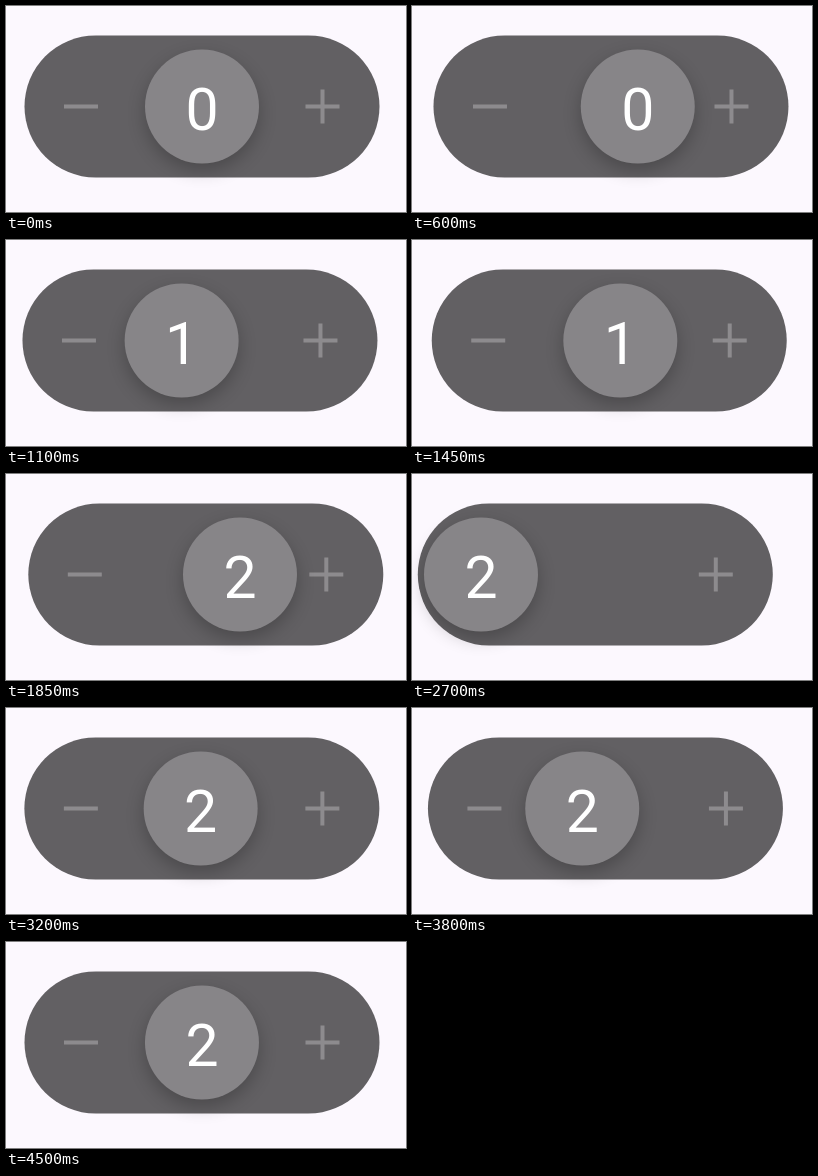
An HTML page with a canvas for the animation above (4.6 s loop, 400 by 206 pixels).

```html
<!DOCTYPE html>
<html lang="en">
<head>
<meta charset="utf-8">
<title>Stepper</title>
<style>
  html, body { margin: 0; width: 100%; height: 100%; overflow: hidden; background: #fcf8fe; }
  canvas { display: block; width: 400px; height: 206px; }
</style>
</head>
<body>
<canvas id="stage" width="400" height="206"></canvas>
<script>
const ctx = document.getElementById('stage').getContext('2d');
const LOOP = 4600, TICK = 50;
const CENTER = { x: 196, y: 100.5 };
const FOLLOW = 0.1; // share of the thumb's travel the track takes on

// Each drag pulls the thumb to `reach`, holds it, then lets it spring back.
const drags = [
  { start: 480,  held: 860,  release: 925,  reach: 126,  step: 1 },
  { start: 1390, held: 1720, release: 1762, reach: 147,  step: 1 },
  { start: 2200, held: 2630, release: 2725, reach: -127, step: 0 },
  { start: 3175, held: 3620, release: 3706, reach: -127, step: 0 },
];

const smooth = p => p * p * (3 - 2 * p);

// Under-damped spring: stiffness 400, damping ratio 0.5.
function spring(ms) {
  const s = ms / 1000, freq = 20, ratio = 0.5;
  const root = Math.sqrt(1 - ratio * ratio), angle = freq * root * s;
  return Math.exp(-ratio * freq * s) * (Math.cos(angle) + ratio / root * Math.sin(angle));
}

function dragOffset(d, t) {
  if (t <= d.start) return 0;
  if (t < d.release) return d.reach * smooth(Math.min(1, (t - d.start) / (d.held - d.start)));
  return d.reach * spring(t - d.release);
}

function bar(x, y, w, h) {
  ctx.fillRect(x - w / 2, y - h / 2, w, h);
}

function drawTrack(shift) {
  ctx.save();
  ctx.translate(shift, 0);
  ctx.fillStyle = '#626063';
  ctx.beginPath();
  ctx.arc(89.5, CENTER.y, 71, Math.PI / 2, Math.PI * 1.5);
  ctx.arc(302.5, CENTER.y, 71, -Math.PI / 2, Math.PI / 2);
  ctx.fill();
  ctx.fillStyle = '#8d8b8e';
  bar(75, CENTER.y, 34, 4);
  bar(316.5, CENTER.y, 34, 4);
  bar(316.5, CENTER.y, 4, 34);
  ctx.restore();
}

function drawThumb(x, count) {
  ctx.save();
  ctx.shadowColor = 'rgba(0, 0, 0, 0.24)';
  ctx.shadowBlur = 18;
  ctx.shadowOffsetY = 7;
  ctx.fillStyle = '#878588';
  ctx.beginPath();
  ctx.arc(x, CENTER.y, 57, 0, Math.PI * 2);
  ctx.fill();
  ctx.restore();

  ctx.fillStyle = '#fff';
  ctx.font = '59px Roboto, sans-serif';
  ctx.textAlign = 'center';
  ctx.fillText(count, x, 123.5);
}

function draw(t) {
  let offset = 0, count = 0;
  for (const d of drags) {
    offset += dragOffset(d, t);
    if (t >= d.release) count += d.step;
  }
  ctx.fillStyle = '#fcf8fe';
  ctx.fillRect(0, 0, 400, 206);
  drawTrack(offset * FOLLOW);
  drawThumb(CENTER.x + offset, count);
}

const begin = performance.now();
function frame() {
  const t = (performance.now() - begin) % LOOP;
  draw(Math.floor(t / TICK) * TICK);
  requestAnimationFrame(frame);
}
frame();
</script>
</body>
</html>
```
